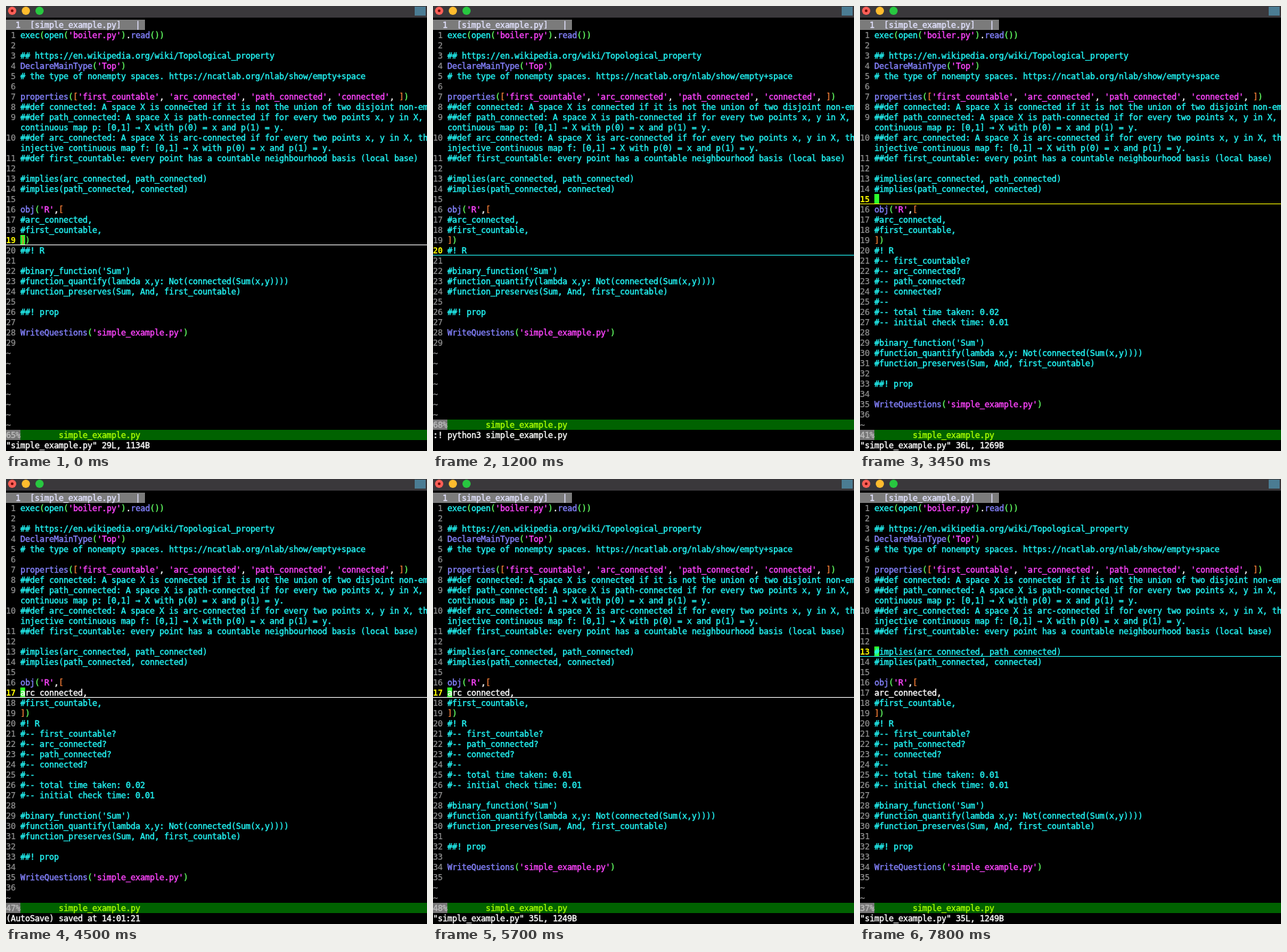
Write an HTML page that moves like this. It is 615 px wide and 651 px high and loops after 8000 ms.

```html
<!DOCTYPE html>
<html lang="en">
<head>
<meta charset="utf-8">
<title>Terminal session</title>
<style>
html, body { margin: 0; width: 100%; height: 100%; overflow: hidden; background: #000; }
#stage {
  position: relative; width: 615px; height: 651px; overflow: hidden; background: #000; color: #fff;
  font: 12px/16px "DejaVu Sans Mono", "Liberation Mono", monospace;
  letter-spacing: -.224px; font-variant-ligatures: none; -webkit-text-stroke: .38px currentColor;
}
#stage div { position: absolute; }
.row { left: 0; height: 15px; white-space: pre; }
#bar { left: 0; top: 0; width: 615px; height: 17px; background: #3a383b; }
#bar i { position: absolute; top: 1px; width: 12px; height: 12px; border-radius: 50%; }
#bar i b { position: absolute; left: 4px; top: 4px; width: 4px; height: 4px; border-radius: 50%; background: #6d0b08; }
#icon { top: 1px; width: 16px; height: 13px; background: #4b7c93; }
#tab { top: 20px; width: 203px; background: #7b7b7b; color: #e2e2ff; }
#status { width: 615px; background: #006200; color: #a8ff00; }
#pct { left: 0; top: 0; width: 21px; height: 15px; background: #767676; color: #bcbcbc; }
#name { left: 77px; }
#cursor { width: 7px; height: 15px; background: #2cff2c; }
#line { left: 0; width: 615px; height: 1px; }
.com, .sys { color: #22f6f6; }
.str { color: #ff45ff; }
.fn { color: #8583ff; }
.par { color: #62ff62; }
.brk { color: #f07b35; }
.num, .til { color: #929292; -webkit-text-stroke-width: .2px; }
.now { color: #ff0; font-weight: bold; -webkit-text-stroke-width: 0; }
</style>
</head>
<body>
<div id="stage">
  <div id="bar">
    <i style="left:3px;background:#ff5f57"><b></b></i>
    <i style="left:23px;background:#febc2e"></i>
    <i style="left:43px;background:#28c840"></i>
    <div id="icon"></div>
  </div>
  <div id="tab" class="row">  1  [simple_example.py]   |</div>
  <div id="cursor"></div>
  <div id="text"></div>
  <div id="line"></div>
  <div id="status" class="row"><div id="pct"></div><div id="name">simple_example.py</div></div>
  <div id="cmd" class="row"></div>
  <div id="below" class="row" style="top:635px"></div>
</div>
<script>
const CW = 7, RH = 15, TOP = 20, LOOP = 8000;
const $ = id => document.getElementById(id);
const rowY = r => TOP + r * RH;

// A "\n" inside a line marks a soft wrap.
const head = [
  "exec(open('boiler.py').read())", "",
  "## https://en.wikipedia.org/wiki/Topological_property",
  "DeclareMainType('Top')",
  "# the type of nonempty spaces. https://ncatlab.org/nlab/show/empty+space", "",
  "properties(['first_countable', 'arc_connected', 'path_connected', 'connected', ])",
  "##def connected: A space X is connected if it is not the union of two disjoint non-empty",
  "##def path_connected: A space X is path-connected if for every two points x, y in X, \ncontinuous map p: [0,1] → X with p(0) = x and p(1) = y.",
  "##def arc_connected: A space X is arc-connected if for every two points x, y in X, there\ninjective continuous map f: [0,1] → X with p(0) = x and p(1) = y.",
  "##def first_countable: every point has a countable neighbourhood basis (local base)", "",
  "#implies(arc_connected, path_connected)",
  "#implies(path_connected, connected)", "",
  "obj('R',["
];
const tail = [
  "", "#binary_function('Sum')",
  "#function_quantify(lambda x,y: Not(connected(Sum(x,y))))",
  "#function_preserves(Sum, And, first_countable)", "",
  "##! prop", "", "WriteQuestions('simple_example.py')", ""
];
const answers = (names, time) => [
  ...names.map(n => `#-- ${n}?`), "#--",
  `#-- total time taken: ${time}`, "#-- initial check time: 0.01"
];
const doc = (arc, mark, extra = []) =>
  [...head, arc, "#first_countable,", "])", mark, ...extra, ...tail];

const four = answers(["first_countable", "arc_connected", "path_connected", "connected"], "0.02");
const three = answers(["first_countable", "path_connected", "connected"], "0.01");
const start = doc("#arc_connected,", "##! R");
const marked = doc("#arc_connected,", "#! R");
const asked = doc("#arc_connected,", "#! R", four);
const edited = doc("arc_connected,", "#! R", four);
const final = doc("arc_connected,", "#! R", three);

const info = (lines, bytes) => `"simple_example.py" ${lines}L, ${bytes}B`;
const saved = s => `(AutoSave) saved at 14:01:${s}`;
const run = ":! python3 simple_example.py";
const first = info(29, 1134), second = info(36, 1269), third = info(35, 1249);

const shell = { shell: true, hide: true };
const steps = [
  [0, start, 19, first],
  [150, start, 20, first],
  [450, marked, 20, saved(17)],
  [1200, marked, 20, run, shell],
  [1350, marked, 20, run, { ...shell, shift: true }],
  [1500, marked, 20, "", { ...shell, shift: true, below: second }],
  [1650, asked, 20, second],
  [3450, asked, 15, second],
  [3750, asked, 16, second],
  [4050, asked, 17, second],
  [4350, asked, 17, second, { hide: true }],
  [4500, edited, 17, saved(21)],
  [5400, edited, 17, run, { ...shell, shift: true }],
  [5700, final, 17, third],
  [7200, final, 16, third],
  [7350, final, 15, third],
  [7500, final, 14, third],
  [7800, final, 13, third]
];

const span = (cls, s) => `<span class="${cls}">${s}</span>`;

function paint(s) {
  if (s[0] === "#") return span("com", s);
  return s.replace(/'[^']*'|\w+(?=\()|[()]|[[\]]/g, m => {
    if (m[0] === "'") return span("str", m);
    if (/[()]/.test(m)) return span("par", m);
    if (/[[\]]/.test(m)) return span("brk", m);
    return span(/^(exec|open)$/.test(m) ? "sys" : "fn", m);
  });
}

// The underline takes the comment colour, or the line number's on an empty line.
const lineColor = s => !s ? "#ff0" : s[0] === "#" ? "#22f6f6" : "#fff";

function show([, lines, at, msg, opt = {}]) {
  const end = opt.shell ? 39 : 40;
  let row = 1, html = "", here = 0;
  const put = s => { html += `<div class="row" style="top:${rowY(row++)}px">${s}</div>`; };

  lines.forEach((s, i) => {
    const n = i + 1, [a, wrap] = s.split("\n");
    if (n === at) here = row;
    put(span(n === at ? "now" : "num", String(n).padStart(2)) + " " + paint(a));
    if (wrap) put("   " + span("com", wrap));
  });
  while (row < end) put(span("til", "~"));
  $("text").innerHTML = html;

  const cur = $("cursor").style, line = $("line").style;
  cur.display = opt.hide && !opt.below ? "none" : "block";
  cur.left = (opt.below ? opt.below.length : 3) * CW + "px";
  cur.top = rowY(opt.below ? 41 : here) + "px";
  line.top = rowY(here) + RH - 1 + "px";
  line.background = lineColor(lines[at - 1]);

  $("status").style.top = rowY(end) + "px";
  $("pct").textContent = Math.floor(at * 100 / lines.length) + "%";
  $("cmd").style.top = rowY(end + 1) + "px";
  $("cmd").textContent = msg;
  $("below").textContent = opt.below || "";
  $("icon").style.left = (opt.shift ? 593 : 597) + "px";
}

let shown;
const origin = performance.now();
function tick() {
  const t = (performance.now() - origin) % LOOP;
  const step = steps.findLast(s => s[0] <= t);
  if (step !== shown) show(shown = step);
  requestAnimationFrame(tick);
}
tick();
</script>
</body>
</html>
```
